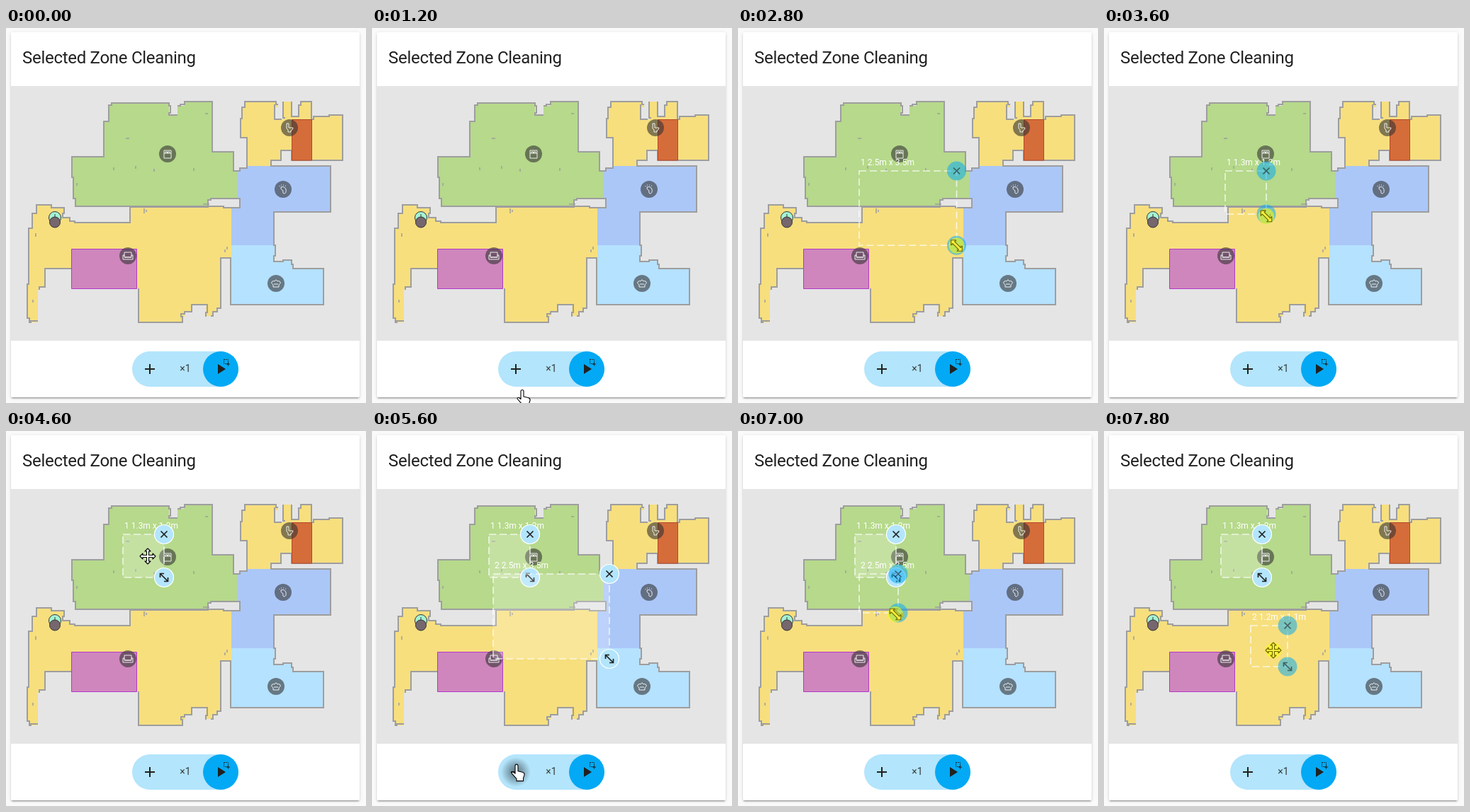
These frames come from a looping animation (508x530 px, 8 s). An HTML page:

```html
<!DOCTYPE html>
<html lang="en">
<head>
<meta charset="utf-8">
<title>Selected Zone Cleaning</title>
<style>
  html, body { margin: 0; width: 100%; height: 100%; overflow: hidden; background: #fafafa; }
  .card {
    position: absolute; left: 7px; top: 6px; width: 492px; height: 516px;
    background: #fff; border-radius: 2px;
    box-shadow: 0 2px 2px rgba(0,0,0,.14), 0 1px 5px rgba(0,0,0,.12), 0 3px 1px -2px rgba(0,0,0,.2);
  }
  svg { position: absolute; left: 0; top: 0; font-family: Roboto, sans-serif; fill: #212121; }
  .walls { fill: none; stroke: #9e9e9e; stroke-width: 2; }
  .badge { fill: rgba(50,50,50,.6); }
  .icon { fill: none; stroke: #eee; stroke-width: 1; stroke-linejoin: round; }
  .line { fill: none; stroke: #212121; stroke-width: 1.7; }
  .label { font-size: 12px; fill: #fff; }
  .frame { fill: rgba(255,255,255,.2); stroke: rgba(255,255,255,.75); stroke-width: 1.6; stroke-dasharray: 10 5; }
  .handle { fill: #b3e5fc; stroke: #fff; stroke-width: 1.2; }
  .active .frame { fill: none; }
  .active .handle { fill: rgba(3,169,244,.52); stroke: none; }
  .active .line { opacity: .6; }
  .cursor { fill: #fff; stroke: #000; stroke-width: 1.1; stroke-linejoin: round; }
  .pressed .cursor { fill: #f7ee3a; stroke: #6b6500; }
</style>
</head>
<body>
<div class="card"></div>
<svg width="508" height="530" viewBox="0 0 508 530">
  <defs>
    <radialGradient id="glow">
      <stop offset="0" stop-opacity=".5"/>
      <stop offset=".45" stop-opacity=".3"/>
      <stop offset="1" stop-opacity="0"/>
    </radialGradient>
  </defs>
  <text x="23" y="50" font-size="24" letter-spacing="-.288">Selected Zone Cleaning</text>
  <path fill="#e5e5e5" d="M7 82H499V442H7Z"/>

  <!-- rooms -->
  <path fill="#b6d98b" d="M149 106H230V123H242V110H252V104H291V175H321V202H327V253H98V241H95V211H93V182H138V132H145V109H149Z"/>
  <path fill="#abc7f8" d="M326 203H331V198H340V195H458V260H378V308H318V254H326Z"/>
  <path fill="#b5e2ff" d="M318 307H379V322H378V330H391V328H403V334H405V340H448V391H317V325H318Z"/>
  <path fill="#f7df7e" d="M337 104H381V108H384V112H379V129H391V104H403V125H413V109H416V104H431V129H434V125H456V123H475V187H403V173H388V187H374V195H340V155H331V128H333V112H337Z"/>
  <path fill="#f7df7e" d="M43 250H64V254H83V262H81V268H90V273H97V275H175V253H318V325H303V396H298V401H292V407H282V391H262V401H252V408H248V416H187V368H93V340H55V366H47V370H45V416H33V410H30V362H32V283H37V262H43Z"/>
  <path fill="#e5e5e5" d="M285 252V243H289V241H331V254H307V252Z"/>

  <!-- walls -->
  <g class="walls">
    <path d="M285 252H98V241H95V211H93V182H138V132H145V109H149V106H230V110H232V120H230V123H242M242 110H246V108H252V104H291V175H321V202H330V198H340V155H331V128H333V112H337V104H381V108H384"/>
    <path d="M379 108V129H389M391 104V127H394M403 104V125H413V109H416V104H431V129H434V125H456V123H475V187H403V173H388V187H374V195H458V260H378V307H380V322H378V330H391V328H403V334H405V340H448V391H317V325H303V396H298V401H292V407H289"/>
    <path d="M282 408V402H284V391H262V401H252V404H247V408H249V416H187V368M93 340H55V366H47V370M45 414H35V416H33V410H30V362H32V283H37V262H43V250H64V254H82V262H80V268H90V273H97V275H175V253H285V243H289V241H330V254H307V252H285"/>
    <path stroke-width="1.5" d="M169 156H174M183 195V199M152 197V201M209 199V203M265 198V202M100 219V223M281 121H285M278 249H287M195 255V262M198 257V260M42 290V295M38 384V388M312 309V313M309 313V317"/>
  </g>

  <path fill="#d56d3a" stroke="#b5472a" d="M403.500 129.500H431.500V187H403.500Z"/>
  <path fill="#cf86bd" stroke="#b13ac7" d="M92.500 312.500H184.500V368.500H92.500Z"/>

  <!-- dock and robot -->
  <g stroke="#333">
    <circle cx="69" cy="268" r="8.500" fill="#a4f2d4"/>
    <path d="M69 263V268" fill="none"/>
    <circle cx="69" cy="274.500" r="7.500" fill="#76666e"/>
  </g>

  <!-- room badges -->
  <g transform="translate(228 178)"><circle class="badge" r="12"/><path class="icon" d="M-5-5H5V6H-5ZM-5-1H5M-3-1V-3H-.5V-1M.5-1V-3H3V-1"/></g>
  <g transform="translate(400 141)"><circle class="badge" r="12"/><path class="icon" d="M-4-6H-1V0H5Q5 3 2 4V6H-2V3L-4 1Z"/></g>
  <g transform="translate(391 228)"><circle class="badge" r="12"/><path class="icon" d="M-3-3Q2-5 4 0Q5 6 1 6Q-1 5 0 2Q-4 0-3-3ZM-5-4V-5M-3-6H-2M0-6H1M3-5H4"/></g>
  <g transform="translate(172 322)"><circle class="badge" r="12"/><path class="icon" d="M-5 0V-5H5V0M-7-1H-5V2H5V-1H7V5H-7ZM-5 2H5"/></g>
  <g transform="translate(381 361)"><circle class="badge" r="12"/><path class="icon" d="M-4 5V2Q-8-1-5-3Q-3-4-2-3Q0-7 2-3Q3-4 5-3Q8-1 4 2V5ZM-2 2V0M0 2V0M2 2V0"/></g>

  <!-- controls -->
  <rect x="178" y="457" width="150" height="50" rx="25" fill="#b3e5fc"/>
  <circle cx="303" cy="482" r="25" fill="#03a9f4"/>
  <path d="M299 475V489L310 482Z"/>
  <path class="line" style="stroke-width:1;stroke-dasharray:1.500 1" d="M307.500 468.500H313.500V474.500H307.500Z"/>
  <path class="line" style="stroke-width:1" d="M313.500 472.500V477.500M311 475H316"/>
  <path class="line" style="stroke-width:2" d="M203 475V489M196 482H210"/>
  <text x="253" y="486" font-size="14" text-anchor="middle" fill-opacity=".85">×1</text>

  <g id="overlay"></g>
</svg>
<script>
const LOOP = 8000, STEP = 200, PIXELS_PER_METRE = 46.8;
const overlay = document.getElementById('overlay');

const within = (t, from, to) => t >= from && t < to;

// Linear interpolation through [time, ...values] keys.
function track(t, keys) {
  const next = keys.findIndex(key => key[0] > t);
  if (next < 0) return keys[keys.length - 1].slice(1);
  if (next === 0) return keys[0].slice(1);
  const a = keys[next - 1], b = keys[next];
  const p = (t - a[0]) / (b[0] - a[0]);
  return a.slice(1).map((v, i) => v + (b[i + 1] - v) * p);
}

const zones = [
  { shown: 1800, settled: 3600, active: [[2600, 3800], [4000, 4600]],
    place: [[4000, 171, 202], [4600, 165, 146]],
    size: [[2600, 164, 120], [3400, 58, 61]] },
  { shown: 5600, settled: 7200, active: [[6400, 7200], [7400, 8000]],
    place: [[7400, 171, 202], [7800, 207, 275]],
    size: [[6400, 164, 120], [7000, 55, 55], [7200, 52, 58]] },
];

const cursorPath = [
  [1200, 212, 512], [1400, 196, 489], [1800, 196, 489], [2200, 305, 350],
  [2400, 333, 330], [2600, 335, 322], [3400, 229, 264], [3600, 229, 266],
  [3800, 206, 233], [4000, 206, 233], [4600, 200, 177], [4800, 201, 240],
  [5200, 204, 473], [5800, 204, 471], [6200, 335, 322], [6400, 335, 322],
  [7000, 222, 259], [7200, 203, 237], [7400, 203, 237], [7800, 239, 310],
];
const cursorKinds = [
  [1200, 'hand'], [2000, 'move'], [2400, 'resize'], [3800, 'move'],
  [5000, 'hand'], [6000, 'move'], [6200, 'resize'], [7200, 'move'],
];
const presses = [[1600, 1800], [2600, 3800], [4000, 4600], [5400, 5600], [6400, 7200], [7400, 8000]];
const ripples = [[1600, 2200], [5400, 6000]];

const cursorShapes = {
  hand: '<path class="cursor" d="M-2 1.5a2 2 0 0 1 4 0V9l6.500 1.500q3 .8 2.500 4L9.500 19V23H0V20L-7 12q0-2.500 2.500-1.500L-2 12.500Z"/>',
  move: '<path class="cursor" d="M0-11l4 4h-2.500v5.500h5.500v-2.500l4 4-4 4v-2.500h-5.500v5.500h2.500l-4 4-4-4h2.500v-5.500h-5.500v2.500l-4-4 4-4v2.500h5.500v-5.500h-2.500z"/>',
  resize: '<path class="cursor" transform="rotate(45)" d="M-11 0l5-5v3h12v-3l5 5-5 5v-3h-12v3z"/>',
};
const closeIcon = 'M-4.500-4.500L4.500 4.500M4.500-4.500L-4.500 4.500';
const resizeIcon = 'M-5-5L5 5M-5.500 0V-5.500H0M5.500 0V5.500H0';

const handle = (x, y, icon) =>
  `<g transform="translate(${x} ${y})"><circle class="handle" r="13.500"/><path class="line" d="${icon}"/></g>`;

const metres = px => (Math.floor(px / PIXELS_PER_METRE * 10) / 10).toFixed(1) + 'm';

function drawZone(zone, index, t) {
  if (t < zone.shown) return '';
  const [x, y] = track(t, zone.place), [w, h] = track(t, zone.size);
  const [labelW, labelH] = track(t < zone.settled ? 0 : t, zone.size);
  const active = zone.active.some(span => within(t, ...span));
  return `<g class="${active ? 'active' : ''}">
    <rect class="frame" x="${x}" y="${y}" width="${w}" height="${h}"/>
    <text class="label" x="${x + 2}" y="${y - 8}">${index + 1} ${metres(labelH)} x ${metres(labelW)}</text>
    ${handle(x + w, y, closeIcon)}${handle(x + w, y + h, resizeIcon)}</g>`;
}

function drawCursor(t) {
  if (t < cursorKinds[0][0]) return '';
  const [x, y] = track(t, cursorPath);
  const kind = cursorKinds.filter(key => key[0] <= t).pop()[1];
  const pressed = presses.some(span => within(t, ...span));
  const halo = pressed ? '<circle r="11" fill="#ff0" fill-opacity=".55"/>' : '';
  return `<g class="${pressed ? 'pressed' : ''}" transform="translate(${x} ${y})">${halo}${cursorShapes[kind]}</g>`;
}

function drawRipple(t) {
  const span = ripples.find(r => within(t, ...r));
  if (!span) return '';
  const fade = t - span[0] < 400 ? 1 : .5;
  return `<circle cx="203" cy="482" r="21" fill="url(#glow)" opacity="${fade}"/>`;
}

function render(now) {
  const t = Math.floor(now % LOOP / STEP) * STEP;
  overlay.innerHTML = drawRipple(t) + zones.map((zone, i) => drawZone(zone, i, t)).join('') + drawCursor(t);
  requestAnimationFrame(render);
}
requestAnimationFrame(render);
</script>
</body>
</html>
```
